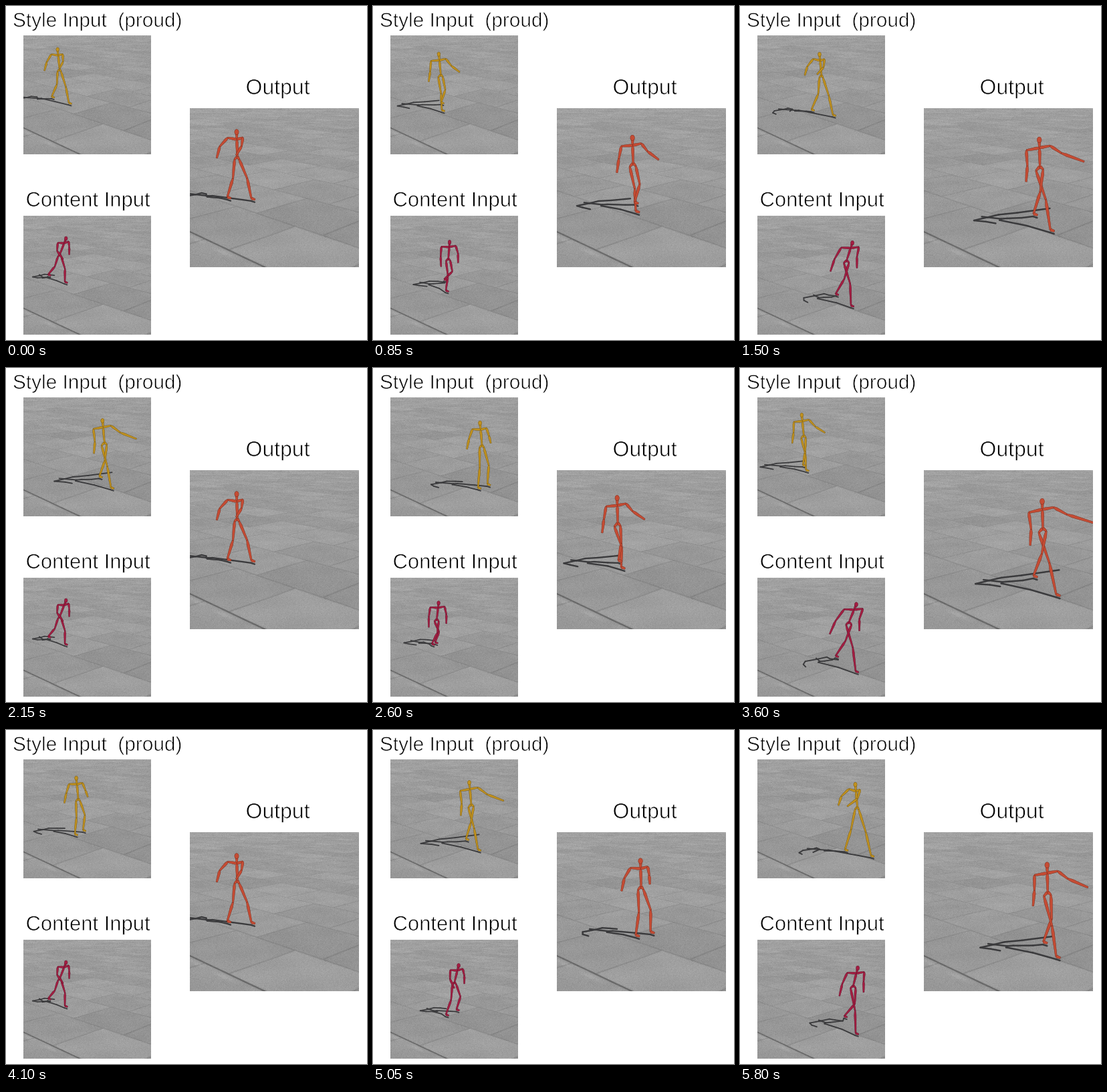
Animation, 540 px wide and 500 px high, one loop 5.85 s. Source, as a matplotlib script:

```python
import numpy as np
import matplotlib.pyplot as plt
from matplotlib.animation import FuncAnimation
from matplotlib.collections import LineCollection, PolyCollection
from matplotlib.patches import Rectangle
from matplotlib.patheffects import Stroke

W, H, DPI, STEP, FRAMES = 540, 500, 100, 50, 117
PT = 72 / DPI
HOLDS = (25, 31)  # frames that repeat the one before

# Arm joints as (rest x, y, swing x, y); shoulders from the neck,
# elbows and hands from the pelvis, left side first.
PROUD = dict(
    shoulders=[(-17, 1, 3, -4), (13, -3, -4, 0)],
    elbows=[(-22, -7, -6, -10), (21, -18, -16, 2)],
    hands=[(-25, 14, -8, -13), (37, -5, -43, 3)],
)
NEUTRAL = dict(
    shoulders=[(-16, -1, 3, 0), (13, -3, -4, -1)],
    elbows=[(-15, -5, 11, -3), (20, -11, 0, -5)],
    hands=[(-13, 16, 24, -7), (20, 8, 0, -9)],
)

CHAINS = [(11, 13), (13, 15), (12, 14), (14, 16), (9, 11), (10, 12), (2, 9), (2, 10),
          (1, 2), (0, 1), (1, 3), (1, 6), (3, 4), (4, 5), (6, 7), (7, 8)]


def bone(a, b, w):
    """Tapered bar, widest near its first joint."""
    d = b - a
    n = np.array([-d[1], d[0]]) / max(np.hypot(*d), 1e-6) * w
    k = a + 0.22 * d
    return [a - 0.55 * n, k - n, b - 0.6 * n, b + 0.6 * n, k + n, a + 0.55 * n]


def disc(c, rx, ry):
    u = np.linspace(0, 2 * np.pi, 18)
    return np.column_stack([c[0] + rx * np.cos(u), c[1] + ry * np.sin(u)])


def floor(w, h, ss=4):
    """Stone slabs in perspective, drawn from two vanishing points."""
    x = 275 + (np.arange(w * ss) + 0.5) / ss * 253 / w
    y = 153 + (np.arange(h * ss) + 0.5) / ss * 238 / h
    x, y = np.meshgrid(x, y)
    depth = y - 117
    p, q = (x + 192) / depth, (1040 - x) / depth
    seam = 2.114
    row = (p - seam) / 0.82
    i = np.floor(row)
    col = q / 0.95 + 0.37 * i
    j = np.floor(col)
    shade = (np.sin(i * 12.99 + j * 78.23) * 43758.5) % 1
    img = 0.6 + 0.05 * (shade - 0.5)
    img += 0.01 * np.sin(3.1 * p + 2 * np.sin(2.3 * q)) * np.sin(4.3 * q + 5 * shade)
    img += 0.01 * np.sin(9 * p + 3 * q + 6 * shade) * np.sin(7 * q - 2 * p)
    img += 0.03 * np.exp(-(y - 153) / 70)
    gap = np.minimum(np.minimum(row - i, 1 - row + i) * 0.82,
                     np.minimum(col - j, 1 - col + j) * 0.95)
    img -= 0.07 * np.exp(-(gap / 0.012) ** 2)
    img -= 0.16 * np.exp(-((p - seam) / 0.01) ** 2)
    img += 0.05 * np.exp(-((p - seam + 0.06) / 0.03) ** 2) * (0.5 + 0.5 * np.sin(14 * q))
    img = img.reshape(h, ss, w, ss).mean(axis=(1, 3))
    return img + np.random.default_rng(4).normal(0, 0.015, img.shape)


class Walker:
    """Stick figure whose whole pose follows from where its feet are."""

    def __init__(self, ax, box, size, period, colors, arms, plants, gait, hip,
                 shift, tall, lean, lift, bend):
        self.size, self.period, self.arms = size, period, arms
        self.plants = [np.array(p, float) for p in plants]
        self.first, self.cycle, self.swing = gait
        self.hip, self.shift, self.tall, self.lean = hip, shift, tall, lean
        self.lift, self.bend = lift, bend
        self.horizon, self.span = box[1] - 36 * size, 0.8 * box[3]
        face, edge = colors
        self.shadow = LineCollection([], colors="#3a3a3c", capstyle="round", zorder=2)
        self.bones = PolyCollection([], facecolors=face, edgecolors=edge,
                                    linewidths=0.45 * PT, zorder=3)
        for c in (self.shadow, self.bones):
            ax.add_collection(c, autolim=False)
            c.set_clip_path(Rectangle(box[:2], *box[2:], transform=ax.transData))

    def foot(self, side, t):
        """Ankle position and how far the leg is into its swing (0..1)."""
        plants = self.plants[side]
        start = self.first - (1 - side) * self.cycle / 2
        pos, arc = plants[0].copy(), 0
        for k, move in enumerate(np.diff(plants, axis=0)):
            u = np.clip((t - start - k * self.cycle) / self.swing, 0, 1)
            pos += move * u ** 1.7
            arc += 4 * u * (1 - u)
        pos[1] -= self.lift * arc
        return pos, arc

    def skeleton(self, t):
        """Joints, the ground height under each, and the nearness scale."""
        feet = [self.foot(side, t) for side in (0, 1)]
        left, right = feet[0][0], feet[1][0]
        ground = (left[1] + right[1]) / 2
        s = self.size * (0.6 + 0.4 * (ground - self.horizon) / self.span)
        apart = right[0] - left[0]
        sway = apart / (40 * self.size)

        hip_x, hip_y, slope = self.hip
        x = (left[0] + right[0]) / 2 + self.shift
        bob = 0.12 * (22 * self.size - abs(apart))
        pelvis = np.array([x, hip_y + slope * (x - hip_x) + bob])
        head = pelvis + [self.lean[0] + self.lean[1] * abs(apart), -self.tall * s]
        neck = head + 0.3 * (pelvis - head)

        def arm(part, side, origin):
            rest_x, rest_y, dx, dy = self.arms[part][side]
            return origin + s * np.array([rest_x + sway * dx, rest_y + sway * dy])

        upper, hips, knees, toes = [head, neck, pelvis], [], [], []
        for side, (ankle, arc) in enumerate(feet):
            shoulder = arm("shoulders", side, neck)
            upper += [shoulder, arm("elbows", side, pelvis), arm("hands", side, pelvis)]
            hip = pelvis + 0.3 * (shoulder - neck) + [0, 5 * s]
            leg = ankle - hip
            out = np.array([leg[1], -leg[0]]) / np.hypot(*leg)
            hips.append(hip)
            knees.append((hip + ankle) / 2 + out * (self.bend[0] + self.bend[1] * arc))
            toes.append(ankle + s * np.array([6, 2]))
        pts = np.vstack([upper, hips, knees, [left, right], toes])
        base = ground - 0.25 * (pts[:, 0] - x)
        base[13:] = pts[13:, 1] + 1
        base[11:13] = (ground + base[13:15]) / 2
        return pts, base, s

    def pose(self, clock):
        pts, base, s = self.skeleton(clock % self.period)
        h = base - pts[:, 1]
        dark = np.column_stack([pts[:, 0] - 0.7 * h, base - 0.09 * h + 3 * s])
        self.shadow.set_segments([dark[[a, b]] for a, b in CHAINS])
        self.shadow.set_linewidth(2.4 * s * PT)
        shapes = [bone(pts[a], pts[b], 2.1 * s) for a, b in CHAINS]
        self.bones.set_verts(shapes + [disc(pts[0], 3.3 * s, 4.3 * s)])


fig = plt.figure(figsize=(W / DPI, H / DPI), dpi=DPI, facecolor="white")
ax = fig.add_axes([0, 0, 1, 1])
ax.axis("off")

STYLE_BOX = (26, 44, 191, 178)
CONTENT_BOX = (26, 314, 191, 178)
OUTPUT_BOX = (275, 153, 253, 238)

stage = np.ones((H, W))
for bx, by, bw, bh in (STYLE_BOX, CONTENT_BOX, OUTPUT_BOX):
    stage[by:by + bh, bx:bx + bw] = floor(bw, bh)
ax.imshow(stage, cmap="gray", vmin=0, vmax=1, extent=(0, W, H, 0),
          interpolation="nearest", aspect="auto")
ax.set_xlim(0, W)
ax.set_ylim(H, 0)

for x, y, px, label in ((10, 31, 29.8, "Style Input  (proud)"),
                        (29.5, 300, 31, "Content Input"),
                        (358.5, 132, 32, "Output")):
    ax.text(x, y, label, family="Liberation Sans", size=px * PT, color="black",
            va="baseline", path_effects=[Stroke(linewidth=0.8 * PT, foreground="white")])

# gait: first lift of the right foot, full cycle, swing time (ms)
walkers = [
    Walker(ax, STYLE_BOX, 0.75, 2950, ("#c1921f", "#75560f"), PROUD,
           plants=[[(67, 137), (103, 156), (157, 179)], [(94, 145), (139, 163), (196, 188)]],
           gait=(600, 1400, 700), hip=(80, 96, 0.23), shift=-1,
           tall=42, lean=(-3, 0), lift=4, bend=(1.5, 4)),
    Walker(ax, CONTENT_BOX, 0.75, 2000, ("#a51d42", "#5c1027"), NEUTRAL,
           plants=[[(63, 402), (109, 426), (173, 454)], [(88, 413), (143, 431), (199, 462)]],
           gait=(650, 890, 380), hip=(81, 373, 0.11), shift=5,
           tall=34, lean=(1, 0.33), lift=10, bend=(3, 5)),
    Walker(ax, OUTPUT_BOX, 1, 2000, ("#c54c34", "#7a2818"), PROUD,
           plants=[[(331, 286), (393, 307), (473, 339)], [(367, 288), (439, 311), (503, 346)]],
           gait=(650, 890, 380), hip=(352, 228, 0.13), shift=-3,
           tall=38.5, lean=(-1, 0), lift=2, bend=(3, 4)),
]


def update(n):
    clock = STEP * (n - sum(n >= k for k in HOLDS))
    for w in walkers:
        w.pose(clock)
    return []


anim = FuncAnimation(fig, update, frames=FRAMES, interval=STEP, repeat=True,
                     repeat_delay=0, blit=False)
plt.show()
```
